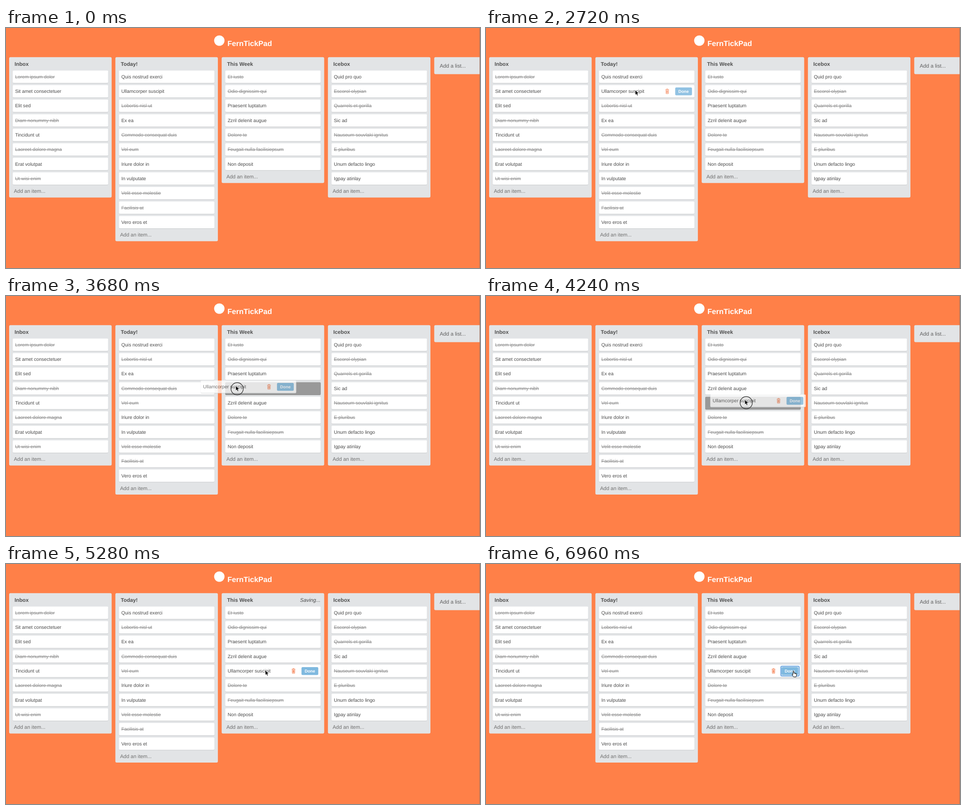
These frames come from a looping animation (1051x533 px, 8000 ms). An HTML page:

```html
<!DOCTYPE html>
<html lang="en">
<head>
<meta charset="utf-8">
<title>Task board</title>
<style>
html, body { margin: 0; width: 100%; height: 100%; overflow: hidden; background: #ff8048; }
svg { display: block; width: 100%; height: 100%; }
text { font-family: "Liberation Sans", Arial, sans-serif; font-size: 10.6px; fill: #4a4a4a; text-rendering: geometricPrecision; white-space: pre; }
.brand { font-size: 16.5px; font-weight: bold; fill: #fff; }
.head { font-size: 11.7px; font-weight: bold; fill: #505050; }
.saving { font-size: 11.6px; font-style: italic; }
.add { font-size: 11.35px; fill: #707070; }
.addlist { font-size: 11.7px; fill: #606060; }
.struck { fill: #8c8c8c; text-decoration: line-through; }
.btn { font-size: 9.3px; font-weight: bold; fill: #fff; }
</style>
</head>
<body>
<svg id="stage" viewBox="0 0 1051 533"></svg>
<script>
const LOOP = 8000, TICK = 80;
const PITCH = 32.3, TOP = 94.5, CARD_W = 211.5, CARD_H = 27.5;
const MOVED = 'Ullamcorper suscipit';
const TODAY = 1, WEEK = 2;

// A leading "-" marks a finished item.
const lists = [
  [7, 'Inbox', '-Lorem ipsum dolor|Sit amet consectetuer|Elit sed|-Diam nonummy nibh|Tincidunt ut|-Laoreet dolore magna|Erat volutpat|-Ut wisi enim'],
  [242.5, 'Today!', 'Quis nostrud exerci|-Lobortis nisl ut|Ex ea|-Commodo consequat duis|-Vel eum|Iriure dolor in|In vulputate|-Velit esse molestie|-Facilisis at|Vero eros et'],
  [478.2, 'This Week', '-Et iusto|-Odio dignissim qui|Praesent luptatum|Zzril delenit augue|-Dolore te|-Feugait nulla facilisiepsum|Non deposit'],
  [713.8, 'Icebox', 'Quid pro quo|-Escorol olypian|-Quarrels et gorilla|Sic ad|-Nauseum souvlaki ignitus|-E pluribus|Unum defacto lingo|Igpay atinlay']
].map(([x, name, items]) => ({ x, name, items: items.split('|') }));

// Pointer path: time, x, y, and whether the move towards the key is eased.
const path = [
  [560, 597, 510], [720, 575, 436],
  [1200, 575, 436], [1600, 380, 173, 1],
  [1760, 380, 173], [2160, 338, 138, 1],
  [2240, 338, 138], [2400, 331, 138],
  [2960, 331, 138], [3120, 335, 138], [3360, 373, 143], [3520, 442, 170], [3680, 509.5, 199.5],
  [3920, 509.5, 199.5], [4240, 574, 230.5, 1], [4400, 575, 236],
  [5360, 575, 236], [6080, 681, 243, 1],
  [6160, 681, 243], [6560, 681, 237, 1]
];

function pointer(t) {
  let i = path.findIndex(k => k[0] > t);
  if (i < 0) i = path.length - 1;
  const a = path[i - 1], b = path[i];
  let p = Math.min(1, (t - a[0]) / (b[0] - a[0]));
  if (b[3]) p = p * p * (3 - 2 * p);
  return { x: a[1] + (b[1] - a[1]) * p, y: a[2] + (b[2] - a[2]) * p };
}

const rect = (x, y, w, h, fill, r = 0, more = '') =>
  `<rect x="${x}" y="${y}" width="${w}" height="${h}" rx="${r}" fill="${fill}" ${more}/>`;
const text = (x, y, s, cls = '', more = '') => `<text x="${x}" y="${y}" class="${cls}" ${more}>${s}</text>`;
const group = (x, y, s, more = '') => `<g transform="translate(${x} ${y})" ${more}>${s}</g>`;

const ARROW = '<path d="M0 0V10.6L2.4 8.4L4.1 12.2L6 11.4L4.4 7.6H7.7Z" fill="#000" stroke="#fff" stroke-width=".7"/>';
const HAND = '<path d="M2.8 8V1.7Q2.8.5 3.8.5T4.8 1.7V5.2Q6 4.4 6.8 5.4Q8 4.9 8.7 5.9Q10.4 5.6 10.6 7.2V9.6L9.5 13.8H4.2L.7 9Q.4 7.2 2.8 8.4M6.8 5.4V7.3M8.7 5.9V7.5" fill="#fff" stroke="#000" stroke-width="1" stroke-linejoin="round"/>';
const TRASH = '<path d="M147.4 10H155.2M149.8 9.8V8.6H152.8V9.8M148.3 10.5L148.7 19.1H153.9L154.3 10.5M150.1 11.5V17.7M151.3 11.5V17.7M152.5 11.5V17.7" fill="none" stroke="#f4703c" stroke-width=".85"/>';

function buttons(alpha, focus) {
  const glow = focus
    ? rect(167.2, 3, 41.4, 22.4, '#fff', 3, 'stroke="#a9cdf2" stroke-width="2"') +
      rect(168, 3.8, 39.8, 20.8, '#fff', 2, 'stroke="#5f9edb" stroke-width="1.4"')
    : '';
  return `<g opacity="${alpha}">${TRASH}${glow}${rect(169, 5.2, 37.2, 17.6, '#7fb9df', 2.5)}${text(187.6, 17.4, 'Done', 'btn', 'text-anchor="middle"')}</g>`;
}

function card(item, extra = '') {
  const struck = item[0] === '-';
  return rect(0, 1, CARD_W, CARD_H, '#c8cacc', 2) + rect(0, 0, CARD_W, CARD_H, '#fff', 2) +
    text(5.2, 17.4, struck ? item.slice(1) : item, struck ? 'struck' : '') + extra;
}

const gap = rect(0, 1, CARD_W, CARD_H, '#8b8b8b', 2) + rect(0, 0, CARD_W, CARD_H, '#999', 2);

function drawList(list, slot, slotArt, saving) {
  const cards = list.items.map(i => card(i));
  if (slot >= 0) cards.splice(slot, 0, slotArt);
  const end = TOP + cards.length * PITCH;
  return rect(list.x, 64.8, 227.3, end + 23.6 - 64.8, '#e2e4e6', 3) +
    text(list.x + 12, 83.5, list.name, 'head') +
    (saving ? text(list.x + 219, 83.5, 'Saving...', 'saving', 'text-anchor="end"') : '') +
    cards.map((c, i) => group(list.x + 8, TOP + i * PITCH, c)).join('') +
    text(list.x + 10.5, end + 13, 'Add an item...', 'add');
}

function draw(t) {
  const shown = t >= 560;
  const p = shown ? pointer(t) : { x: 0, y: 0 };
  const dragging = t >= 3040 && t < 4720;
  const pressed = (t >= 2960 && t < 4720) || (t >= 6880 && t < 6960);

  let home = TODAY, slot = 1;
  if (t >= 4720) { home = WEEK; slot = 4; }
  else if (dragging) {
    home = p.x > 478 ? WEEK : TODAY;
    slot = Math.floor((p.y - 92) / PITCH);
  }
  const fade = Math.max(0, Math.min(1, (t - 2480) / 280));
  const art = dragging ? gap : card(MOVED, buttons(fade, t >= 6880));

  let s = rect(0, 0, 1051, 533, '#ff8048') +
    '<circle cx="473" cy="28" r="11.5" fill="#fff"/>' +
    text(491, 40.3, 'FernTickPad', 'brand');
  lists.forEach((list, i) => {
    const saving = t >= 4800 && (i === TODAY && t < 5280 || i === WEEK && t < 5440);
    s += drawList(list, i === home ? slot : -1, art, saving);
  });
  s += rect(949.5, 64.8, 110, 37.7, '#e2e4e6', 3) + text(961.7, 87.7, 'Add a list...', 'addlist') +
    rect(1050, 0, 1, 533, '#a0705c');

  if (dragging) {
    const gx = 250.5 + (p.x - 331) * 1.016, gy = TOP + PITCH + p.y - 138.5;
    s += group(gx, gy, card(MOVED, buttons(1)), 'opacity=".75"');
  }
  if (shown) {
    const hand = t >= 5440 && p.x > 655;
    if (pressed) s += `<circle cx="${p.x + 3}" cy="${p.y + (hand ? 2 : 6.5)}" r="13.6" fill="none" stroke="#222" stroke-width="1.2"/>`;
    s += hand ? group(p.x - 3, p.y, HAND) : group(p.x, p.y, ARROW);
  }
  return s;
}

const stage = document.getElementById('stage');
let last = -1;
function frame() {
  const tick = Math.floor(performance.now() % LOOP / TICK) * TICK;
  if (tick !== last) stage.innerHTML = draw(last = tick);
  requestAnimationFrame(frame);
}
frame();
</script>
</body>
</html>
```
